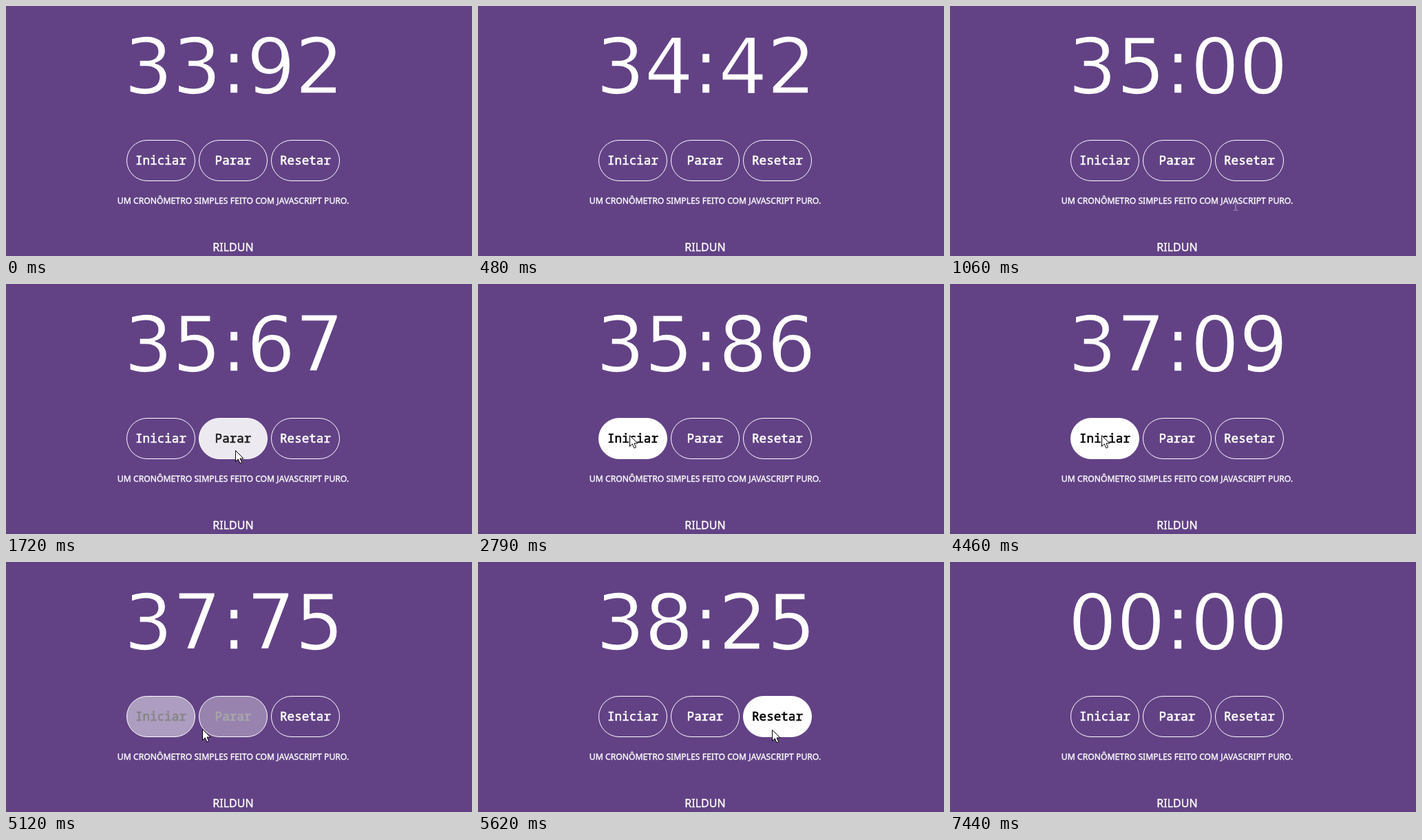
Write an HTML page that moves like this. It is 677 px wide and 364 px high and loops after 7.52 s.

```html
<!DOCTYPE html>
<html lang="pt-BR">
<head>
<meta charset="utf-8">
<title>Cronômetro</title>
<style>
  html, body { margin: 0; width: 100%; height: 100%; overflow: hidden; background: #624285; }
  svg { display: block; width: 677px; height: 364px; }
  text { text-anchor: middle; fill: #fff; stroke: #fff; stroke-width: .35px; }
  /* an outline in the background colour thins the digits */
  #clock { font: 112px "DejaVu Sans", sans-serif; letter-spacing: -0.7px; stroke: #624285; stroke-width: 1.6px; }
  .label { font: 17.6px "Noto Sans Mono", monospace; stroke-width: .6px; }
  .note { font: 12.2px "Noto Sans", sans-serif; }
  .link { font: 16px "Noto Sans", sans-serif; }
</style>
</head>
<body>
<svg viewBox="0 0 677 364">
  <rect width="677" height="364" fill="#624285"/>
  <text id="clock" x="330.8" y="126.7">33:92</text>
  <g id="buttons"></g>
  <text class="note" x="330" y="288">UM CRONÔMETRO SIMPLES FEITO COM JAVASCRIPT PURO.</text>
  <text class="link" x="330" y="357">RILDUN</text>
  <g id="cursor">
    <path id="arrow" d="M.5.5V16.5L4.3 13 7 19 9.6 17.8 7 12H12Z" fill="#fff" stroke="#000"/>
    <path id="beam" d="M-3-7.5H-1L0-6.5 1-7.5H3M0-6.5V6.5M-3 7.5H-1L0 6.5 1 7.5H3" fill="none" stroke="#b5a6c4"/>
  </g>
</svg>
<script>
const LOOP = 7520;
const TICKS = 91;             // picture refreshes per loop
const STEP = LOOP / TICKS;
const FADE = 300;
const FIRST = 3392;           // hundredths shown when the loop starts
const RATE = .1007;           // hundredths per ms
const PAUSE = { at: 1926, length: 1318 };
const RESET = 71;             // tick of the reset click
const $ = id => document.getElementById(id);
const clamp = (v, lo, hi) => Math.min(hi, Math.max(lo, v));

const easeOut = p => 1 - (1 - p) ** 2;
const easeInOut = p => p * p * (3 - 2 * p);

// Cursor glides, each a quadratic curve between two ticks
const away = [597, 337], parar = [333, 242], iniciar = [220, 220], resetar = [427, 244], exit = [548, 385];
const glides = [
  { start: 8, end: 21, from: away, bend: [427, 316], to: parar, ease: easeOut },
  { start: 29, end: 33, from: parar, bend: [270, 226], to: iniciar, ease: easeInOut },
  { start: 58.5, end: 67, from: iniciar, bend: [300, 262], to: resetar, ease: easeInOut },
  { start: 79, end: 83, from: resetar, bend: [485, 310], to: exit, ease: easeInOut }
];

// hovers: [enter tick, leave tick]
const buttons = [
  { text: "Iniciar", hovers: [[30.4, 61]] },
  { text: "Parar", hovers: [[18.8, 30.2], [61.4, 64]] },
  { text: "Resetar", hovers: [[64.2, 79.5]] }
];

function add(parent, tag, attrs) {
  const el = document.createElementNS("http://www.w3.org/2000/svg", tag);
  for (const key in attrs) el.setAttribute(key, attrs[key]);
  return parent.appendChild(el);
}

buttons.forEach((b, i) => {
  const x = 175 + 105 * i;
  b.box = add($("buttons"), "rect", {
    x: x + .5, y: 195.5, width: 99, height: 59, rx: 29.5, fill: "#fff", stroke: "#fff"
  });
  b.label = add($("buttons"), "text", { class: "label", x: x + 50, y: 231 });
  b.label.textContent = b.text;
});

function fade(ticks) {
  return 1 - (1 - clamp(ticks * STEP / FADE, 0, 1)) ** 2.3;
}

function drawButton(b, k) {
  const glow = Math.max(...b.hovers.map(([on, off]) => fade(k - on) - fade(k - off)));
  const c = Math.round(255 * (1 - glow));
  b.box.setAttribute("fill-opacity", glow.toFixed(3));
  b.label.style.fill = b.label.style.stroke = `rgb(${c},${c},${c})`;
}

function drawCursor(k) {
  const first = glides[0], last = glides[glides.length - 1];
  $("cursor").style.display = k >= first.start && k < last.end ? "" : "none";

  const g = glides.filter(g => g.start <= k).pop() || first;
  const s = g.ease(clamp((k - g.start) / (g.end - g.start), 0, 1)), r = 1 - s;
  const [x, y] = [0, 1].map(i =>
    Math.round(r * r * g.from[i] + 2 * r * s * g.bend[i] + s * s * g.to[i]));
  const onText = y > 275 && y < 293 && x > 161 && x < 499;
  $("cursor").setAttribute("transform", `translate(${x} ${y})`);
  $("arrow").style.display = onText ? "none" : "";
  $("beam").style.display = onText ? "" : "none";
}

function drawClock(k) {
  const ms = k * STEP;
  const running = ms - clamp(ms - PAUSE.at, 0, PAUSE.length);
  const n = k < RESET ? Math.round(FIRST + running * RATE) : 0;
  const two = v => String(v).padStart(2, "0");
  $("clock").textContent = two(Math.floor(n / 100)) + ":" + two(n % 100);
}

function draw(ms) {
  // ticks fall a quarter step early
  const k = Math.min(TICKS - 1, Math.floor(ms / STEP + .25));
  drawClock(k);
  buttons.forEach(b => drawButton(b, k));
  drawCursor(k);
}

const start = performance.now();
function frame() {
  draw((performance.now() - start) % LOOP);
  requestAnimationFrame(frame);
}
draw(0);
requestAnimationFrame(frame);
</script>
</body>
</html>
```
